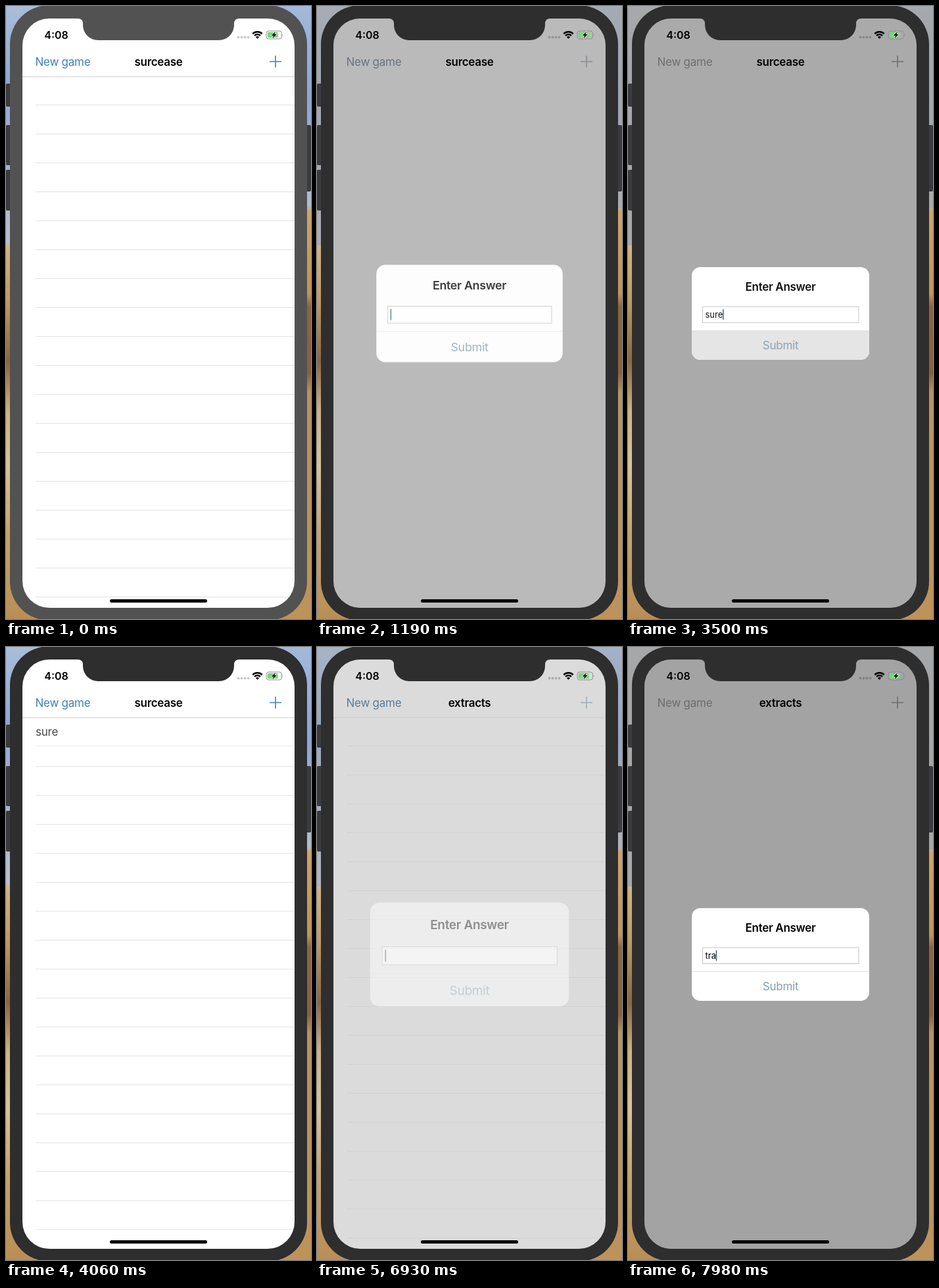
These frames come from a looping animation (464x932 px, 8000 ms). An HTML page:

```html
<!DOCTYPE html>
<html lang="en">
<head>
<meta charset="utf-8">
<title>Word game</title>
<style>
  html, body { margin: 0; width: 100%; height: 100%; overflow: hidden; background: #fff; }
  svg { display: block; width: 464px; height: 932px; }
  text { font: 400 17px Inter, sans-serif; letter-spacing: -.25px; }
  .bold { font-weight: 600; letter-spacing: -.3px; }
  .mid { text-anchor: middle; }
  .line { stroke: #e2e2e4; }
</style>
</head>
<body>
<svg viewBox="0 0 464 932">
  <defs>
    <linearGradient id="left" x2="0" y2="1">
      <stop offset="0" stop-color="#aabdd9"/>
      <stop offset=".12" stop-color="#8fa9d5"/>
      <stop offset=".385" stop-color="#b8bfce"/>
      <stop offset=".395" stop-color="#d0b283"/>
      <stop offset=".48" stop-color="#c09a66"/>
      <stop offset=".58" stop-color="#8a6643"/>
      <stop offset=".66" stop-color="#cdb283"/>
      <stop offset=".75" stop-color="#d9c39a"/>
      <stop offset=".86" stop-color="#c6a36e"/>
      <stop offset="1" stop-color="#b98e55"/>
    </linearGradient>
    <linearGradient id="right" x2="0" y2="1">
      <stop offset="0" stop-color="#a3b9da"/>
      <stop offset=".15" stop-color="#8ca7d4"/>
      <stop offset=".326" stop-color="#b3bccf"/>
      <stop offset=".334" stop-color="#cda468"/>
      <stop offset=".47" stop-color="#c0945a"/>
      <stop offset=".49" stop-color="#8c6440"/>
      <stop offset=".6" stop-color="#87613f"/>
      <stop offset=".63" stop-color="#b99361"/>
      <stop offset="1" stop-color="#bd935a"/>
    </linearGradient>
    <clipPath id="screen"><rect x="25" y="19" width="414" height="896" rx="41"/></clipPath>
  </defs>

  <rect width="232" height="932" fill="url(#left)"/>
  <rect x="232" width="232" height="932" fill="url(#right)"/>
  <g id="haze" fill="#a6a6a6">
    <rect width="232" height="364"/>
    <rect x="232" width="232" height="308"/>
  </g>

  <g fill="#3a3b3f">
    <rect x="0" y="118" width="9" height="35" rx="2"/>
    <rect x="0" y="181" width="9" height="61" rx="2"/>
    <rect x="0" y="249" width="9" height="62" rx="2"/>
    <rect x="455" y="181" width="9" height="101" rx="2"/>
  </g>
  <rect class="bezel" x="6" y="-1" width="452" height="935" rx="59"/>

  <g clip-path="url(#screen)">
    <rect x="25" y="19" width="414" height="896" fill="#fff"/>
    <g id="lines">
      <path d="M25 107.5H439" stroke="#cfcfd1"/>
      <g id="rows"></g>
      <path id="firstLine" class="line" d="M45 150.5H439"/>
    </g>
    <text id="word" x="45" y="134.7">sure</text>
    <text id="newGame" x="44.5" y="91">New game</text>
    <path id="plus" d="M401 84.5h18M410 75.5v18" stroke-width="1.6"/>
    <text id="title" class="bold mid" x="232" y="91"></text>
    <path d="M353.5 47.5h16" stroke="#cbcbcd" stroke-width="4" stroke-linecap="round" stroke-dasharray="0 5"/>
    <rect id="dim" x="25" y="19" width="414" height="896"/>

    <g id="alert">
      <rect id="panel" x="97" y="397" width="270" height="141" rx="13" fill="#fff"/>
      <path id="pressed" d="M97 494H367V525a13 13 0 0 1-13 13H110a13 13 0 0 1-13-13z" fill="#e4e4e4"/>
      <g id="content">
        <text class="bold mid" x="232" y="433">Enter Answer</text>
        <rect x="113.5" y="457" width="237.5" height="24.5" fill="#fff" stroke="#c3c3c3"/>
        <text id="typed" x="117.5" y="473.5" style="font-size:13px;letter-spacing:0"></text>
        <rect id="caret" y="461" width="1.6" height="16" fill="#4e6483"/>
        <path d="M97 493.5H367" stroke="#e2e2e2"/>
        <text class="mid" x="232" y="522.3" fill="#829eb0">Submit</text>
      </g>
    </g>
  </g>

  <path class="bezel" d="M109 17V19Q117 19 117 27V29a23 23 0 0 0 23 23H324a23 23 0 0 0 23-23V27Q347 19 355 19V17z"/>
  <text class="bold mid" x="76.5" y="49.7" style="font-size:16px;letter-spacing:0">4:08</text>
  <path d="M375.3 42.3a10.2 10.2 0 0 1 14.4 0M378.05 45.05a6.3 6.3 0 0 1 8.9 0" fill="none" stroke="#000" stroke-width="2.4"/>
  <path d="M382.5 49.8l-2.6-2.6a3.7 3.7 0 0 1 5.2 0z"/>
  <rect x="396" y="38" width="23.5" height="12" rx="3.6" fill="none" stroke="#8d8d8d"/>
  <rect x="397.8" y="39.8" width="16" height="8.4" rx="2" fill="#72d978"/>
  <path d="M420.8 42q1.6 2 0 4z" fill="#8d8d8d"/>
  <path d="M410 38.8L403.6 45H407L405.4 49.4L411.8 43.1H408.4z" stroke="#fff" stroke-width="1.2" paint-order="stroke"/>
  <rect x="158" y="902" width="148" height="5" rx="2.5"/>
</svg>

<script>
const LOOP = 8000, STEP = 70;
const $ = id => document.getElementById(id);
const set = (id, attrs) => { for (const k in attrs) $(id).setAttribute(k, attrs[k]); };
const opacity = (id, v) => set(id, { opacity: v });

const ramp = (t, a, b) => Math.min(1, Math.max(0, (t - a) / (b - a)));
const smooth = x => x * x * (3 - 2 * x);
const mix = (a, b, p) => `rgb(${a.map((v, i) => Math.round(v + (b[i] - v) * p))})`;
const spring = ms => { const x = Math.max(0, ms) * .018; return 1 - (1 + x) * Math.exp(-x); };
// A bar button fades while held and recovers after release
const held = (t, down, up) => t < down ? 1 : t < up ? .3 : .3 + .7 * ramp(t, up, up + 400);
const typedAt = (t, word, times) => word.slice(0, times.filter(x => t >= x).length);

$('rows').innerHTML = Array.from({ length: 18 }, (_, i) =>
  `<path class="line" d="M45 ${150.5 + 44 * i}H439"/>`).join('');

function draw(t) {
  const second = t >= 5480;
  const opening = spring(t - (second ? 6854 : 1040));
  const shown = opening * (second ? 1 : 1 - smooth(ramp(t, 3440, 3810)));

  const metal = mix([82, 82, 82], [46, 46, 46], ramp(t, 0, 560));
  document.querySelectorAll('.bezel').forEach(e => e.setAttribute('fill', metal));
  opacity('haze', shown * .95);
  opacity('dim', shown * .36);
  opacity('lines', Math.max(0, 1 - 1.5 * shown));

  const tint = mix([62, 128, 185], [168, 168, 168], shown);
  set('newGame', { fill: tint, opacity: held(t, 5350, 5480) });
  set('plus', { stroke: tint, opacity: second ? held(t, 6664, 6814) : held(t, 850, 1000) });
  $('title').textContent = second ? 'extracts' : 'surcease';

  const inserted = second ? 0 : smooth(ramp(t, 3860, 4170));
  set('rows', { transform: `translate(0 ${44 * inserted})` });
  opacity('firstLine', inserted);
  opacity('word', inserted);

  const scale = 1.2 - .2 * opening;
  set('alert', {
    transform: `translate(232 467.5) scale(${scale}) translate(-232 -467.5)`,
    visibility: shown > .002 ? 'visible' : 'hidden'
  });
  opacity('panel', Math.min(1, shown * 1.3));
  opacity('content', shown);
  opacity('pressed', !second && t >= 3250 ? shown : 0);

  const text = second ? typedAt(t, 'tra', [7770, 7840, 7980])
                      : typedAt(t, 'sure', [2100, 2240, 2450, 2590]);
  $('typed').textContent = text;
  const width = text ? $('typed').getComputedTextLength() : 0;
  set('caret', { x: 117.2 + width });
}

function tick(now) {
  const t = now % LOOP;
  draw(t - t % STEP);
  requestAnimationFrame(tick);
}
draw(0);
requestAnimationFrame(tick);
</script>
</body>
</html>
```
